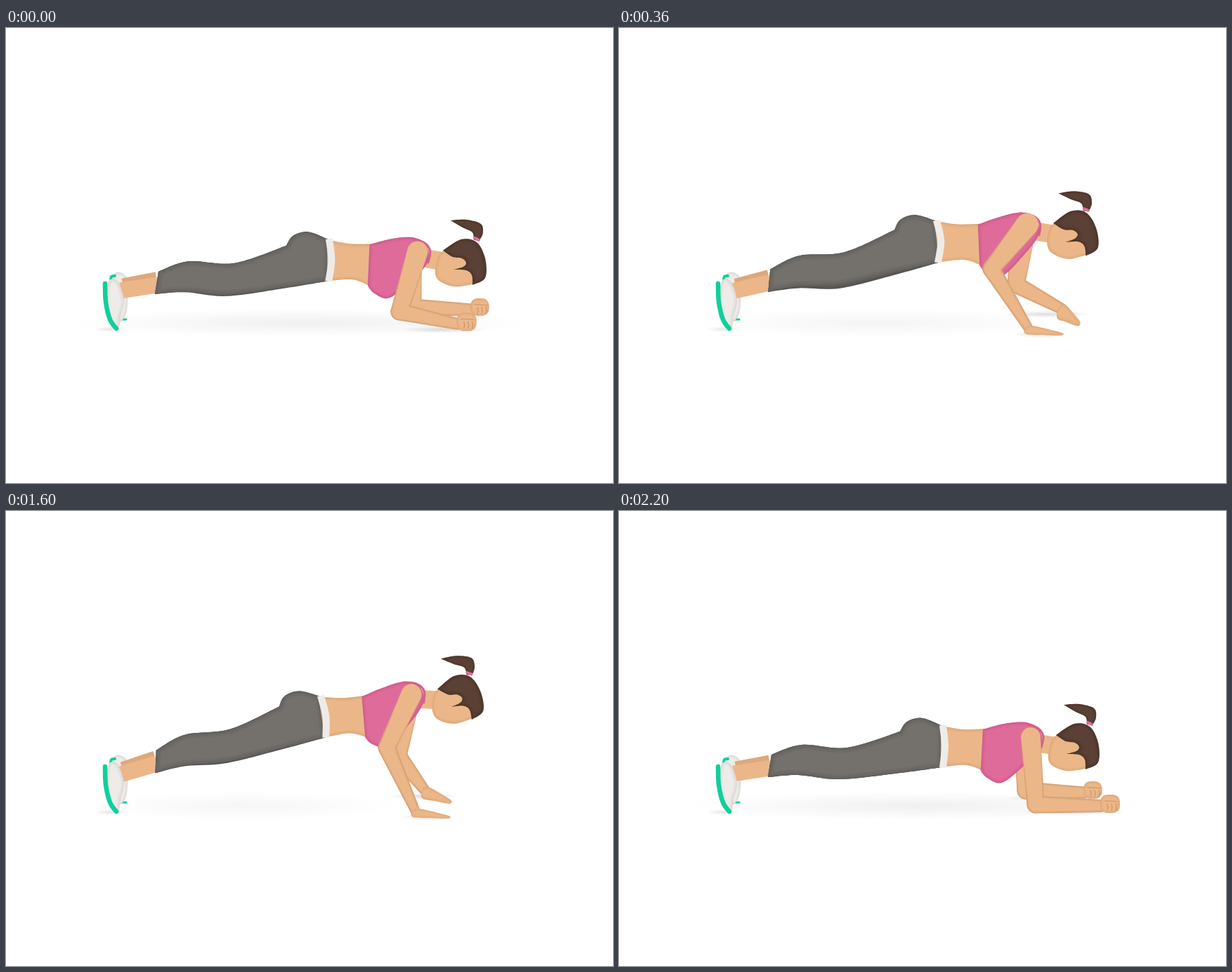
Recreate the animation shown at these times as an HTML page with a canvas. Size 864x648 px, loop 3200 ms.

```html
<!DOCTYPE html>
<html lang="en">
<head>
<meta charset="utf-8">
<title>Plank to push-up</title>
<style>
html, body { margin: 0; width: 100%; height: 100%; overflow: hidden; background: #fff; }
canvas { display: block; width: 864px; height: 648px; }
</style>
</head>
<body>
<canvas id="stage" width="864" height="648"></canvas>
<script>
const ctx = document.getElementById('stage').getContext('2d');

// Each material has a base and an edge colour.
const SKIN = ['#ebb789', '#b87c52'], PANTS = ['#74716c', '#3c3a37'], PINK = ['#df6b9b', '#a83a6c'];
const HAIR = ['#5b4035', '#2c1b16'], WHITE = ['#eeebe8', '#aaa5a1'], GREEN = '#10cf9c';

const STEPS = 6;
const ANKLE = [172, 372];
const ELBOWS = [[593, 418], [560, 404], [531, 376], [524, 353], [530, 343], [542, 337], [571, 330]];

const clamp = v => Math.max(0, Math.min(1, v));
const mix = (a, b, k) => a + (b - a) * k;
const ramp = (a, b, x) => clamp((x - a) / (b - a));

let step; // 0 is the forearm plank, STEPS is straight arms
let lift; // how far each region has risen, 0 to 1
let roll; // how far the body leans over while one arm moves

function setPose(n) {
  const t = n / STEPS;
  step = n;
  lift = { leg: t ** 2.7, hip: t ** 1.35, chest: t ** 1.9, head: t ** 2.2 };
  roll = Math.sin(Math.PI * t) ** 2;
}

// The body is described lying low and swings up around the ankle.
function bend([x, y, corner]) {
  const lower = mix(lift.leg, lift.hip, ramp(210, 400, x));
  const upper = mix(lower, lift.chest, ramp(455, 525, x));
  const k = mix(upper, lift.head, ramp(600, 630, x));
  const a = -k * (11 + 1.4 * ramp(540, 610, x)) * Math.PI / 180;
  const dx = x - ANKLE[0], dy = y - ANKLE[1], c = Math.cos(a), s = Math.sin(a);
  const reach = 7 * k * ramp(540, 620, x);
  const knee = 8 * k * Math.sin(Math.PI * ramp(172, 455, x)) ** 2;
  return [ANKLE[0] + dx * c - dy * s + reach, ANKLE[1] + dx * s + dy * c - knee, corner];
}

// Smooth curve through the points; a third value of 1 marks a sharp corner.
function curve(pts, closed = true) {
  const p = pts.flatMap(q => q[2] ? [q, q] : [q]), n = p.length, path = new Path2D();
  const get = i => closed ? p[(i + n) % n] : p[Math.max(0, Math.min(n - 1, i))];
  path.moveTo(p[0][0], p[0][1]);
  for (let i = 0; i < (closed ? n : n - 1); i++) {
    const [a, b, c, d] = [get(i - 1), get(i), get(i + 1), get(i + 2)];
    if (b === c) continue;
    path.bezierCurveTo(b[0] + (c[0] - a[0]) / 6, b[1] + (c[1] - a[1]) / 6,
      c[0] - (d[0] - b[0]) / 6, c[1] - (d[1] - b[1]) / 6, c[0], c[1]);
  }
  if (closed) path.closePath();
  return path;
}

function fill(path, [color, shade], depth = 1) {
  ctx.save();
  ctx.fillStyle = color;
  ctx.fill(path);
  ctx.clip(path);
  ctx.strokeStyle = shade;
  ctx.globalAlpha = .08;
  for (const w of [2, 5, 9, 14]) {
    ctx.lineWidth = w * depth;
    ctx.stroke(path);
  }
  ctx.restore();
}

const fixed = (pts, colors, depth) => fill(curve(pts), colors, depth);
const body = (pts, colors, depth) => fixed(pts.map(bend), colors, depth);

function line(pts, color, width, cap = 'round') {
  ctx.strokeStyle = color;
  ctx.lineWidth = width;
  ctx.lineCap = cap;
  ctx.stroke(curve(pts, false));
}

function capsule([x1, y1], r1, [x2, y2], r2) {
  const a = Math.atan2(y2 - y1, x2 - x1), b = Math.acos((r1 - r2) / Math.hypot(x2 - x1, y2 - y1));
  ctx.beginPath();
  ctx.arc(x1, y1, r1, a + b, a - b + Math.PI * 2);
  ctx.arc(x2, y2, r2, a - b, a + b);
  ctx.fill();
}

// Layers shrink towards the light core; the shoulder hardly shrinks, so it blends in.
function limb(shoulder, elbow, wrist, wristSize) {
  ['#d49f74', '#dca97d', '#e4b083', SKIN[0]].forEach((color, i) => {
    ctx.fillStyle = color;
    capsule(shoulder, 14 + 3 * roll - i * .2, elbow, 12.5 - i);
    capsule(elbow, 12.5 - i, wrist, wristSize - i);
  });
}

// A fist that opens into a flat palm.
function hand([x, y], open, size) {
  ctx.save();
  ctx.translate(x, y);
  if (open < .3 || open < .5 && size === 1) {
    const fist = new Path2D();
    fist.roundRect(-1, -16, 28 * size, 26 * size, 10);
    fill(fist, SKIN, .5);
    for (const px of [9, 15, 21]) line([[px, -3], [px + 1, 2], [px, 6]], '#c28a61', 1);
    line([[5, -7], [14, -7], [23, -6]], '#c9916a', 1);
  } else {
    ctx.rotate((1 - open) * .35);
    ctx.scale((.5 + .5 * open) * size, 1 + 1.3 * (1 - open));
    fixed([[-6, 1], [4, -4], [36, 3], [49, 7], [45, 10], [18, 9], [-3, 8]], SKIN, .4);
  }
  ctx.restore();
}

function shadow(x, y, rx, ry, alpha) {
  ctx.save();
  ctx.translate(x, y);
  ctx.scale(rx, ry);
  const g = ctx.createRadialGradient(0, 0, 0, 0, 0, 1);
  g.addColorStop(0, `rgba(40,40,45,${alpha})`);
  g.addColorStop(1, 'rgba(40,40,45,0)');
  ctx.fillStyle = g;
  ctx.fillRect(-1, -1, 2, 2);
  ctx.restore();
}

function arms() {
  const nearOpen = clamp(step / 3), farOpen = clamp((step - 3) / 3);
  return {
    near: {
      shoulder: bend([586, 322 - 3 * roll]),
      elbow: ELBOWS[step],
      wrist: [583 + 103 * (1 - nearOpen) ** 1.35, 428 - 8 * (1 - nearOpen) ** .5],
      open: nearOpen, size: 1, thick: mix(9, 6.8, nearOpen)
    },
    far: {
      shoulder: bend([577, 342]),
      elbow: [579 - 21 * farOpen - 8 * Math.sin(Math.PI * farOpen), 398 - 63 * farOpen ** .6],
      wrist: [mix(662, 564, farOpen), mix(401, 397, farOpen)],
      open: farOpen, size: .95, thick: mix(8.5, 7, farOpen)
    }
  };
}

function drawArm({ shoulder, elbow, wrist, open, size, thick }) {
  limb(shoulder, elbow, wrist, thick);
  hand(wrist, open, size);
}

function drawShadows({ near, far }) {
  shadow(mix(425, 300, lift.chest), 420, mix(330, 180, lift.chest), 20, mix(.07, .03, lift.chest));
  shadow(148, 429, 24, 4, .12);
  for (const { wrist: [x, y], open } of [near, far]) {
    shadow(mix(x - 40, x + 18, open), y + 8, mix(75, 38, open), 5, .16);
  }
}

function drawFeet() {
  line([[160, 415], [171, 415]], GREEN, 3);
  fixed([[152, 354], [171, 354], [173, 392], [168, 413], [158, 413]], WHITE, .5);
  line([[149, 360], [150, 354], [155, 353]], GREEN, 4);
  line([[166, 364], [214, 355]].map(bend), '#dda87c', 15, 'butt');
  line([[163, 374], [216, 366]].map(bend), SKIN[0], 23, 'butt');
  fixed([[146, 361], [159, 361], [168, 388], [163, 410], [160, 428], [150, 424], [143, 395]], WHITE, .7);
  line([[141, 364], [142, 390], [148, 415], [157, 428]], GREEN, 6.5);
}

function drawLegs() {
  const top = [[217, 347, 1], [260, 333], [325, 337], [400, 314, 1], [410, 300], [432, 295], [460, 306, 1]];
  const bottom = [[459, 365, 1], [400, 373], [315, 382], [255, 376], [212, 379, 1]];
  const drop = ([x, y, c]) => [x, y + 7 * roll * Math.sin(Math.PI * ramp(212, 459, x)), c];
  body([...top, ...bottom.map(drop)], ['#5f5c58', PANTS[1]], .6);
  body([...top, ...bottom], PANTS);
}

function drawTorso() {
  line([[597, 331], [624, 335]].map(bend), SKIN[0], 26, 'butt');
  body([[458, 306, 1], [490, 311], [522, 310, 1], [522, 372, 1], [495, 362], [458, 365, 1]], SKIN, .7);
  line([[461, 305], [464, 335], [461 - 6 * roll, 365.5]].map(bend), WHITE[0], 10, 'butt');
  body([[518, 311, 1], [548, 303], [578, 301], [598, 311], [600, 337], [575, 364], [545, 387],
    [524, 380], [515, 370, 1]], PINK, .7);
  ctx.fillStyle = SKIN[0];
  ctx.beginPath();
  ctx.arc(...bend([572, 333]), 28 + 3 * roll, 0, Math.PI * 2);
  ctx.fill();
  line([[578, 302], [596, 309], [604, 321], [601, 337]].map(bend), '#d4608f', 3);
}

function drawHead() {
  body([[622, 320], [612, 340], [614, 360], [637, 370], [664, 367, 1], [672, 342], [650, 320]], SKIN, .6);
  body([[633, 276, 1], [655, 275], [676, 281], [679, 294], [674, 305, 1], [666, 304, 1], [664, 293],
    [650, 286]], HAIR, .5);
  const crown = [[622, 319, 1], [648, 303], [670, 307], [682, 330], [682, 358], [664, 368, 1]];
  const hairline = [[663, 354], [655, 347], [637, 346, 1], [651, 342], [655, 336], [649, 330], [636, 328]];
  body([...crown, ...hairline], HAIR, .8);
  line([[667, 301], [673, 304]].map(bend), '#e0709c', 4);
}

function draw() {
  const pair = arms();
  ctx.clearRect(0, 0, 864, 648);
  drawShadows(pair);
  drawFeet();
  drawLegs();
  drawArm(pair.far);
  drawTorso();
  drawHead();
  drawArm(pair.near);
}

// Rise in steps of 120 ms, hold, come down the same way, hold.
function stepAt(ms) {
  const t = ms % 3200;
  const up = Math.min(STEPS, 1 + Math.floor(t / 120));
  return t < 1600 ? up : Math.max(0, 5 - Math.floor((t - 1600) / 120));
}

let start;
function tick(now) {
  start ??= now;
  const next = stepAt(now - start);
  if (next !== step) {
    setPose(next);
    draw();
  }
  requestAnimationFrame(tick);
}
requestAnimationFrame(tick);
</script>
</body>
</html>
```
